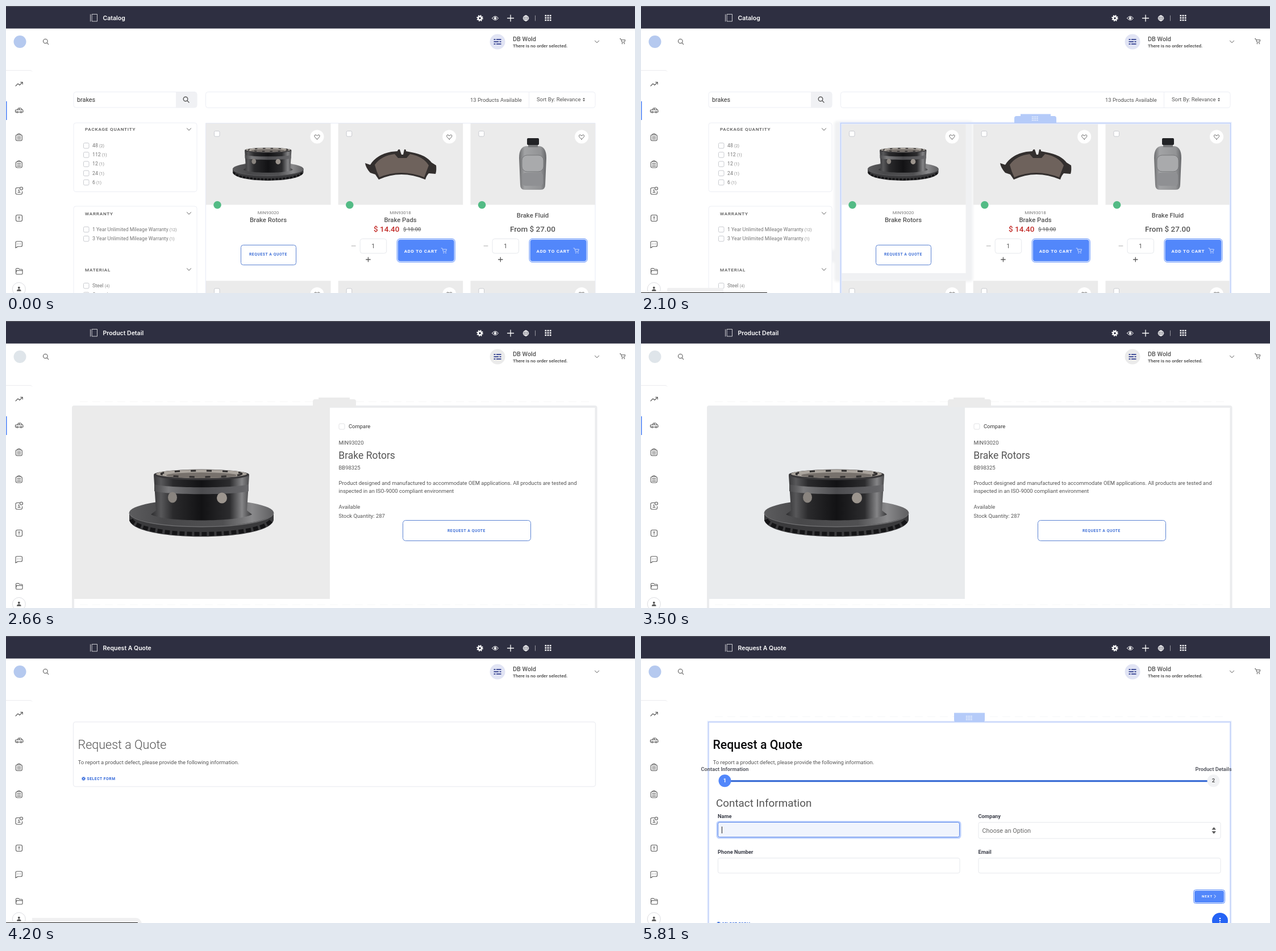
Recreate the animation shown at these times as an HTML page. Size 1107 by 506 pixels, loop 6.23 s.

```html
<!DOCTYPE html>
<html lang="en">
<head>
<meta charset="utf-8">
<title>Catalog</title>
<style>
html, body { margin: 0; width: 100%; height: 100%; overflow: hidden; background: #fff; }
svg { display: block; width: 1107px; height: 506px; font: 400 9.42px Roboto, sans-serif; fill: #555; }
.inter { font: 600 10.5px Inter, sans-serif; fill: #fff; }
.cap { font-size: 8.08px; font-weight: 500; letter-spacing: .82px; }
.opt { font-size: 8.75px; fill: #777; }
.num { font-size: 7.07px; fill: #8a8a8a; }
.sku { font-size: 8px; fill: #777; }
.name { font-size: 11.3px; font-weight: 500; }
.price { font-size: 13.46px; font-weight: 500; }
.md { font-size: 10.8px; }
.lab { font-size: 9.3px; font-weight: 700; fill: #3c3f4a; }
.btn { font-size: 6.7px; font-weight: 700; letter-spacing: .6px; fill: #3d6ed6; }
.mid { text-anchor: middle; }
.line { fill: none; stroke: #5a5a5a; stroke-linecap: round; stroke-linejoin: round; }
.white { stroke: #fff; }
.card { fill: #fff; stroke: #eceef4; }
.field { fill: #fff; stroke: #e6e8ec; }
.box { fill: #fff; stroke: #c9cbd0; }
.outline { fill: #fff; stroke: #5a82d2; }

/* Timeline: 62.3 ms per percent */
[data-a] { animation: 6230ms step-end infinite; }
[data-a=catalog] { animation-name: catalog; }
[data-a=detail] { animation-name: detail; }
[data-a=quote] { animation-name: quote; }
[data-a=select] { animation-name: select; }
[data-a=hover] { animation-name: hover; }
[data-a=status] { animation-name: status; }
[data-a=status2] { animation-name: status2; }
[data-a=rotor] { animation-name: rotor; }
[data-a=press] { animation-name: press; }
[data-a=active] { animation-name: active; }
[data-a=cart] { animation-name: cart; }
[data-a=draft] { animation-name: draft; }
[data-a=ready] { animation-name: ready; }
[data-a=frame] { animation-name: frame; }
[data-a=form] { animation-name: form; }
[data-a=ring] { animation-name: ring; }
[data-a=caret] { animation-name: caret; }
[data-a=logo] { animation-name: logo; }
[data-a=badge] { animation-name: badge; }
[data-a=panel] { animation-name: panel; }
@keyframes catalog { 0% { opacity: 1 } 34.82%, to { opacity: 0 } }
@keyframes detail { 0% { opacity: 0 } 34.82% { opacity: 1 } 67.4%, to { opacity: 0 } }
@keyframes quote { 0% { opacity: 0 } 67.4%, to { opacity: 1 } }
@keyframes select { 0% { opacity: 0 } 17.97% { opacity: .35 } 19.09% { opacity: .7 } 20.21%, to { opacity: 1 } }
@keyframes hover { 0% { opacity: 0 } 25.83% { opacity: .35 } 26.95% { opacity: .7 } 28.08%, to { opacity: 1 } }
@keyframes status { 0% { opacity: 0 } 25.83% { opacity: .4 } 26.95% { opacity: .8 } 28.08% { opacity: 1 }
  38.2% { opacity: .8 } 39.32% { opacity: .6 } 40.44% { opacity: .4 } 41.56% { opacity: .2 } 42.68%, to { opacity: 0 } }
@keyframes status2 { 0% { opacity: 0 } 64.03% { opacity: .5 } 65.16% { opacity: 1 }
  69.65% { opacity: .8 } 70.78% { opacity: .6 } 71.9% { opacity: .4 } 73.02% { opacity: .2 } 74.14%, to { opacity: 0 } }
@keyframes rotor { 0% { opacity: 0 } 35.95%, to { opacity: 1 } }
@keyframes press { 0% { opacity: 0 } 62.91% { opacity: .35 } 64.03% { opacity: .7 } 65.16%, to { opacity: 1 } }
@keyframes active { 0% { opacity: 1 } 67.4%, to { opacity: 0 } }
@keyframes cart { 0% { opacity: 1 } 67.4% { opacity: 0 } 69.65%, to { opacity: 1 } }
@keyframes draft { 0% { opacity: 1 } 71.9%, to { opacity: 0 } }
@keyframes ready { 0% { opacity: 0 } 71.9%, to { opacity: 1 } }
@keyframes frame { 0% { opacity: 0 } 76.39% { opacity: .35 } 77.52% { opacity: .7 } 78.64%, to { opacity: 1 } }
@keyframes form { 0% { opacity: 0 } 71.9% { opacity: .15 } 73.02% { opacity: .3 } 74.14% { opacity: .4 } 75.27% { opacity: .5 }
  84.26% { opacity: .8 } 85.38%, to { opacity: 1 } }
@keyframes ring { 0% { opacity: 0 } 80.89%, to { opacity: 1 } }
@keyframes caret { 0% { opacity: 0 } 77.52% { opacity: 1 } 85.38% { opacity: 0 } 92.13%, to { opacity: 1 } }
@keyframes logo { 0% { fill: #b5c9ef } 34.82% { fill: #dfe5ea } 67.4%, to { fill: #b5c9ef } }
@keyframes badge { 0% { fill: #e1e4f4 } 34.82% { fill: #ebebeb } 67.4%, to { fill: #e1e4f4 } }
@keyframes panel { 0% { fill: #ebebeb } 48.31%, to { fill: #e9ebed } }
</style>
</head>
<body>
<svg viewBox="0 0 1107 506">
<defs>
  <linearGradient id="steel">
    <stop offset="0" stop-color="#2c2c2e"/><stop offset=".1" stop-color="#58585a"/><stop offset=".22" stop-color="#2a2a2c"/>
    <stop offset=".5" stop-color="#121214"/><stop offset=".78" stop-color="#2c2c2e"/><stop offset=".9" stop-color="#858587"/><stop offset="1" stop-color="#38383a"/>
  </linearGradient>
  <linearGradient id="band">
    <stop offset="0" stop-color="#48484a"/><stop offset=".15" stop-color="#7a7a7c"/><stop offset=".5" stop-color="#4c4c4f"/><stop offset="1" stop-color="#68686b"/>
  </linearGradient>
  <linearGradient id="disc">
    <stop offset="0" stop-color="#5c5c5e"/><stop offset=".25" stop-color="#48484a"/><stop offset=".65" stop-color="#505052"/>
    <stop offset=".85" stop-color="#89898b"/><stop offset="1" stop-color="#5e5e60"/>
  </linearGradient>
  <linearGradient id="plastic">
    <stop offset="0" stop-color="#6d6e70"/><stop offset=".2" stop-color="#a2a3a5"/><stop offset=".8" stop-color="#929395"/><stop offset="1" stop-color="#66676a"/>
  </linearGradient>
  <filter id="soft"><feGaussianBlur stdDeviation="2"/></filter>
  <g id="gear" fill="none" stroke="currentColor">
    <circle r="3" stroke-width="2.6"/><circle r="4.8" stroke-width="1.9" stroke-dasharray="1.9 1.87"/>
  </g>
  <g id="cartIcon" fill="none" stroke="currentColor">
    <path d="M-5-4.500h2l2 6h4.500l1.300-4h-6.500"/><circle cx="-.5" cy="3.800" r=".6"/><circle cx="3.300" cy="3.800" r=".6"/>
  </g>
  <path id="chev" class="line" d="M-3.500-1.800 0 1.800 3.500-1.800"/>
  <rect id="check" class="box" width="9.500" height="9.500" rx="2"/>
  <g id="clip" class="line" stroke-width="1.100">
    <rect x="-5.500" y="-4.500" width="11" height="10.500" rx="2.500"/><path d="M-2.500-4.500q0-2 2.500-2t2.500 2M-3-1.500h6M-3 1h6M-3 3.500h6"/>
  </g>
  <g id="tile">
    <rect width="219.500" height="143.500" fill="#ebebeb"/>
    <use href="#check" x="14.500" y="13.500"/>
    <circle cx="195.500" cy="23.500" r="12" fill="#fff"/>
    <path class="line" d="M195.500 27.800c-8-5.500-4-10 0-6 4-4 8 .5 0 6z"/>
  </g>
  <g id="buy">
    <path class="line" style="stroke:#aaa" d="M23.500 216h7"/><path class="line" stroke-width="1.300" d="M49 240h7.500M52.750 236.250v7.500"/>
    <rect class="field" x="38.500" y="203.500" width="46.500" height="25.500" rx="4"/>
    <text class="md mid" x="61.500" y="220">1</text>
    <rect x="103.500" y="203.500" width="102" height="41" rx="5" fill="#fff" stroke="#5287fb"/>
    <rect x="105" y="205" width="99" height="38" rx="4" fill="#5287fb"/>
    <text x="116" y="227.500" font-size="8" font-weight="700" letter-spacing=".75" fill="#fff">ADD TO CART</text>
    <use href="#cartIcon" x="186" y="224.500" color="#c9d9fd"/>
  </g>
  <g id="rotor">
    <path d="M217 337v14c8 39 246 39 254 0v-14z" fill="#3a3a3c"/>
    <path d="M220 350c16 34 232 34 248 0" fill="none" stroke="#151517" stroke-width="7" stroke-dasharray="9 4"/>
    <ellipse cx="344" cy="338" rx="127" ry="24" fill="url(#disc)"/>
    <path d="M217 338c4 33 250 33 254 0" fill="none" stroke="#6e6e70" stroke-width="1.500"/>
    <path d="M260 272l4 62-9 7c24 14 154 14 178 0l-9-7 4-62z" fill="url(#steel)"/>
    <path d="M261 288c24 7 142 7 166 0v12c-24 7-142 7-166 0z" fill="url(#band)"/>
    <ellipse cx="344" cy="271" rx="84" ry="9.500" fill="#3a393b"/>
    <ellipse cx="344" cy="269.500" rx="80" ry="7.500" fill="#aaa49d"/>
    <ellipse cx="344" cy="272" rx="62" ry="5" fill="#77716c"/>
    <ellipse cx="344" cy="269.500" rx="71" ry="5.500" fill="none" stroke="#302e2e" stroke-width="3" stroke-dasharray="9 19"/>
    <ellipse cx="293" cy="311" rx="8" ry="9.500" fill="#89847f"/>
    <ellipse cx="380" cy="312" rx="9" ry="9.500" fill="#9c958e"/>
  </g>
  <path id="dots" d="M-6-3.500h12M-6-.5h12M-6 2.500h12" fill="none" stroke="#fff" stroke-width="1.500" stroke-dasharray="1.500 1.500"/>
  <g id="tab"><path d="M-27-8.500h54V4q0 4-4 4h-46q-4 0-4-4z" fill="#b5cbf9"/><use href="#dots" y="1"/></g>
  <g id="formLink" color="#2b63d9">
    <use href="#gear" transform="scale(.6)"/>
    <text class="btn" x="6" y="2.500" style="fill:#2b63d9">SELECT FORM</text>
  </g>
</defs>

<rect width="1107" height="506" fill="#fff"/>

<g data-a="catalog">
  <g data-a="hover" filter="url(#soft)" fill="#f0f1f3">
    <rect x="340" y="203" width="244" height="283" rx="5"/><rect x="334" y="430" width="14" height="22" rx="3"/>
  </g>
  <rect class="card" x="119" y="151.500" width="217" height="27.500" rx="4"/>
  <path d="M299 152h33q4 0 4 4v19q0 4-4 4h-33z" fill="#f0f1f4"/>
  <text class="md" x="125" y="169" style="fill:#333">brakes</text>
  <g class="line" stroke-width="1.400"><circle cx="316" cy="164" r="3.800"/><path d="M319 167l3 3"/></g>
  <rect class="card" x="351.500" y="151.500" width="685.500" height="28" rx="4"/>
  <path d="M920.500 152v27.500" stroke="#eceef4"/>
  <text x="817" y="168.700">13 Products Available</text>
  <text x="934" y="168">Sort By: Relevance</text>
  <path d="M1015 164.200h4l-2-2.500zM1015 165.800h4l-2 2.500z"/>

  <rect class="card" x="119" y="206" width="217" height="121.500" rx="4"/>
  <rect class="card" x="119" y="353" width="217" height="170" rx="4"/>
  <g class="cap"><text x="139" y="220">PACKAGE QUANTITY</text><text x="139" y="368.500">WARRANTY</text><text x="139" y="467.500">MATERIAL</text></g>
  <use href="#chev" x="322" y="217.500"/><use href="#chev" x="322" y="365.500"/><use href="#chev" x="322" y="464.500"/>
  <use href="#check" x="136.500" y="241.500"/><use href="#check" x="136.500" y="257.700"/><use href="#check" x="136.500" y="273.900"/>
  <use href="#check" x="136.500" y="290.100"/><use href="#check" x="136.500" y="306.300"/><use href="#check" x="136.500" y="389.300"/>
  <use href="#check" x="136.500" y="405.500"/><use href="#check" x="136.500" y="488.500"/><use href="#check" x="136.500" y="504.700"/>
  <g class="opt">
    <text x="152" y="249">48 <tspan class="num">(2)</tspan></text>
    <text x="152" y="265.200">112 <tspan class="num">(1)</tspan></text>
    <text x="152" y="281.400">12 <tspan class="num">(1)</tspan></text>
    <text x="152" y="297.600">24 <tspan class="num">(1)</tspan></text>
    <text x="152" y="313.800">6 <tspan class="num">(1)</tspan></text>
    <text x="152" y="396.700">1 Year Unlimited Mileage Warranty <tspan class="num">(12)</tspan></text>
    <text x="152" y="412.900">3 Year Unlimited Mileage Warranty <tspan class="num">(1)</tspan></text>
    <text x="152" y="496">Steel <tspan class="num">(4)</tspan></text>
    <text x="152" y="512.200">Ceramic</text>
  </g>

  <path d="M351.500 520V206.500h685.500V520" fill="none" stroke="#e6eaf5"/>
  <rect x="352" y="350" width="219.500" height="121" fill="#fff"/>
  <use href="#tile" x="352" y="207"/><use href="#tile" x="584.700" y="207"/><use href="#tile" x="817.500" y="207"/>
  <use href="#tile" x="352" y="484.500"/><use href="#tile" x="584.700" y="484.500"/><use href="#tile" x="817.500" y="484.500"/>
  <g fill="#53bb85"><circle cx="372" cy="350.700" r="6.800"/><circle cx="604.800" cy="350.700" r="6.800"/><circle cx="837.600" cy="350.700" r="6.800"/></g>

  <use href="#rotor" transform="translate(292.700 121.600) scale(.49)"/>
  <path d="M632 277l9 3q11-18 37-23l11-1q1-4 4-3l3 9h3l2-9q3-1 3 3l10 2q24 4 35 18l8 5q1 9-1 15l-12-1q-4 4-6 11-43-18-82 0-4-6-6-9l-9-3q-8-9-9-17z" fill="#332f2e"/>
  <path d="M649 280q11-16 35-19l6 7h15l6-7q23 4 33 20l-8 21q-41-16-79 0-5-10-8-22z" fill="#6e625c"/>
  <path d="M903 268q0-21 14-21h20q14 0 14 21l-2 47q0 9-8 9h-28q-8 0-8-9z" fill="url(#plastic)"/>
  <rect x="908" y="263" width="38" height="29" rx="9" fill="#a9aaac" stroke="#77787b"/>
  <rect x="909" y="294" width="36" height="23" rx="5" fill="#8f9093"/>
  <rect x="917" y="233" width="21" height="12" rx="2" fill="#222326"/>
  <rect x="919" y="245" width="17" height="4" fill="#77787a"/>

  <g class="mid">
    <text class="sku" x="461.500" y="367">MIN93020</text><text class="name" x="461.500" y="380.800">Brake Rotors</text>
    <text class="sku" x="694" y="367">MIN93018</text><text class="name" x="694" y="380.800">Brake Pads</text>
    <text class="name" x="927" y="373">Brake Fluid</text><text class="price" x="927" y="398.200">From $ 27.00</text>
  </g>
  <text class="price" x="647" y="398.200" style="fill:#c22b28">$ 14.40</text>
  <text x="699" y="396.700" text-decoration="line-through">$ 18.00</text>
  <rect class="outline" x="413.500" y="421.500" width="97" height="35" rx="4"/>
  <text class="btn" x="428" y="440.200">REQUEST A QUOTE</text>
  <use href="#buy" x="584.700" y="207"/><use href="#buy" x="817.500" y="207"/>

  <g data-a="select" fill="none">
    <rect x="351.500" y="206.500" width="686" height="320" stroke="#e4ecfe" stroke-width="4"/>
    <rect x="351.500" y="206.500" width="686" height="320" stroke="#b9caf5"/>
    <path d="M657 206v-8q0-4 4-4h7v-3.500h53v3.500h6q4 0 4 4v8z" fill="#b5cbf9"/><use href="#dots" x="694" y="199"/>
  </g>
</g>

<g data-a="detail">
  <path d="M130 142H540M616 142H1030" stroke="#f6f7f7" stroke-dasharray="14 8"/>
  <rect x="118" y="151" width="920.500" height="370" rx="2" fill="#fff" stroke="#ebecee" stroke-width="4"/>
  <rect data-a="panel" x="117" y="150" width="453" height="340" fill="#ebebeb"/>
  <path d="M540 152v-10q0-4 4-4h6v-3h55v3h7q4 0 4 4v10z" fill="#ebebeb"/>
  <use data-a="rotor" href="#rotor"/>
  <path d="M130 500H1030" stroke="#f7f8f8" stroke-dasharray="14 8"/>
  <rect x="586" y="181" width="10" height="10" rx="2" fill="#fff" stroke="#e2e3e5"/>
  <text x="603" y="189" style="fill:#333">Compare</text>
  <text x="585.500" y="217.500">MIN93020</text>
  <text x="585.300" y="242.800" font-size="17.500">Brake Rotors</text>
  <text x="585.500" y="262.300">BB98325</text>
  <text x="585.500" y="288.500">Product designed and manufactured to accommodate OEM applications. All products are tested and</text>
  <text x="585.500" y="302.800">inspected in an ISO-9000 compliant environment</text>
  <text x="585.500" y="330.700">Available</text>
  <text x="585.500" y="347.400">Stock Quantity: 287</text>
  <g data-a="press">
    <rect x="685" y="338" width="252" height="66" rx="20" fill="#f9fafb"/>
    <rect x="691" y="345" width="240" height="52" rx="12" fill="#f1f2f5"/>
    <rect x="694.500" y="348" width="233" height="45" rx="9" fill="#e8eaee"/>
  </g>
  <rect class="outline" x="698.500" y="351.500" width="225" height="36" rx="5"/>
  <text class="btn" x="777" y="372">REQUEST A QUOTE</text>
</g>

<g data-a="quote">
  <g data-a="draft">
    <rect x="118.500" y="151.500" width="919" height="114" rx="4" fill="#fff" stroke="#eeeff3" stroke-width="1.500"/>
    <text x="126.500" y="199" font-size="21.500" font-weight="300">Request a Quote</text>
    <use href="#formLink" x="136.500" y="251.500"/>
  </g>
  <g data-a="ready">
    <path d="M130 142H1030" stroke="#f5f6f8" stroke-dasharray="14 8"/>
    <rect x="118.500" y="151.500" width="919" height="380" rx="3" fill="#fff" stroke="#eeeff3"/>
    <g data-a="frame" fill="none">
      <rect x="118.500" y="151.500" width="919" height="380" stroke="#e6edfe" stroke-width="4"/>
      <rect x="118.500" y="151.500" width="919" height="380" stroke="#b6c8f6"/>
      <use href="#tab" x="578" y="144"/>
    </g>
    <text x="126.500" y="199" font-size="21.300" font-weight="500" style="fill:#0a0a0c">Request a Quote</text>
    <use href="#formLink" x="136.500" y="507"/>
    <circle cx="1019" cy="502" r="14" fill="#2563f5"/>
    <g fill="#fff"><circle cx="1019" cy="498" r="1.300"/><circle cx="1019" cy="502" r="1.300"/><circle cx="1019" cy="506" r="1.300"/></g>
  </g>
  <text x="126.700" y="226.200">To report a product defect, please provide the following information.</text>

  <g data-a="form">
    <text class="lab mid" x="147.500" y="238" style="fill:#5c5e66">Contact Information</text>
    <text class="lab mid" x="1007.500" y="238" style="fill:#5c5e66">Product Details</text>
    <path d="M150 255.700H1000" stroke="#2e63d2" stroke-width="3"/>
    <circle cx="147.500" cy="255.300" r="11" fill="#5287fb"/><circle cx="1007.500" cy="255.300" r="11" fill="#f1f2f4"/>
    <text class="lab mid" x="147.500" y="258.400" style="fill:#fff">1</text><text class="lab mid" x="1007.500" y="258.400" style="fill:#555">2</text>
    <text x="132" y="301.300" font-size="18.840">Contact Information</text>
    <g class="lab">
      <text x="135" y="321.300">Name</text><text x="593.500" y="321.300">Company</text>
      <text x="135" y="383.800">Phone Number</text><text x="593.500" y="383.800">Email</text>
    </g>
    <rect x="135" y="328.500" width="426" height="27" rx="3" fill="#f0f4fd"/>
    <g data-a="ring" fill="none">
      <rect x="134" y="327.500" width="428" height="28.500" rx="4" stroke="#bdd1fd" stroke-width="3"/>
      <rect x="135.500" y="328.500" width="425" height="26" rx="3" stroke="#5b87e8"/>
    </g>
    <path data-a="caret" d="M142.500 336v12" stroke="#222"/>
    <rect class="field" x="594" y="328.500" width="426" height="28.500" rx="3"/>
    <text class="md" x="600.500" y="346.800" style="fill:#666">Choose an Option</text>
    <path d="M1004.500 341.500h7.500l-3.750-4.500zM1004.500 344.200h7.500l-3.750 4.500z"/>
    <rect class="field" x="135.500" y="391.500" width="425.500" height="26.500" rx="3"/>
    <rect class="field" x="594" y="391.500" width="426" height="26.500" rx="3"/>
    <rect x="972.500" y="447.500" width="55" height="24" rx="4" fill="#fff" stroke="#5287fb"/>
    <rect x="974" y="449" width="52" height="21" rx="3" fill="#5287fb"/>
    <text x="987" y="461.300" font-size="6" font-weight="700" letter-spacing="1" fill="#fff">NEXT</text>
    <path class="line white" d="M1009 456.500l2.500 2.500-2.500 2.500"/>
  </g>
</g>

<g fill="#f0f0f1"><rect data-a="status" x="46" y="497" width="99" height="8" rx="2"/><path data-a="status2" d="M46 497h182q8 0 11 9H46z"/></g>

<!-- Sidebar -->
<path d="M0 113.500h42q3 0 4 2" fill="none" stroke="#ececef"/>
<rect data-a="active" y="168" width="1.500" height="33" fill="#4f83f8"/>
<g class="line" stroke-width="1.100">
  <path d="M17 141l4-4 3 2.500 5-5M25.500 134.300h3.700v3.700"/>
  <path d="M18.500 187h-2v-3.500l3.500-.8 2-2.700h4l2.500 2.700q2 .3 1.500 4.300h-2M21 187h4M19 183h9M23.500 180v3"/>
  <circle cx="19.800" cy="187" r="1.300"/><circle cx="26.500" cy="187" r="1.300"/>
  <path d="M24 320.500h-4.500q-2.500 0-2.500 2.500v6.500q0 2.500 2.500 2.500h6.500q2.500 0 2.500-2.500V327M21.500 324.500h1.500v4M21 328.500h4"/>
  <circle cx="27" cy="321.800" r="2.500"/>
  <rect x="17.500" y="368.500" width="11" height="11" rx="2.500"/><path d="M23 371.300v3.200M23 376.700v.1" stroke-width="1.500"/>
  <path d="M19 415h7.500q2 0 2 2v5q0 2-2 2H21l-4 2.500V417q0-2 2-2zM20 419.500h.2M22.800 419.500h.2M25.600 419.500h.2"/>
  <path d="M17.500 471v-7q0-1.500 1.500-1.500h3l1.500 1.700h4q1.500 0 1.500 1.300v6q0 1.500-1.500 1.500H19q-1.500 0-1.500-2zl1-4.500h10.500"/>
</g>
<use href="#clip" x="22.800" y="231.500"/><use href="#clip" x="22.800" y="279"/>
<circle cx="22.800" cy="499" r="11.500" fill="#fff" stroke="#dcdde1"/>
<circle cx="22.800" cy="496.700" r="1.900"/><path d="M19 502.800q0-3.500 3.800-3.500t3.800 3.500z"/>
<rect data-a="status" y="505" width="222" height="2" rx=".5" fill="#222"/>
<rect data-a="status2" y="505" width="232" height="2" rx=".5" fill="#222"/>

<!-- Account row -->
<circle data-a="logo" cx="24.500" cy="63" r="11" fill="#b5c9ef"/>
<g class="line" stroke-width="1.100"><circle cx="69.300" cy="62" r="3.800"/><path d="M72.200 65l2.500 2.700"/></g>
<circle data-a="badge" cx="865" cy="63" r="13.500" fill="#e1e4f4"/>
<path d="M858.500 59h3M863 59h8.500M858.500 63h8.500M868.500 63h3M858.500 67h3M863 67h8.500" stroke="#46529a" stroke-width="2.200"/>
<text class="md" x="892" y="61.700" font-weight="500">DB Wold</text>
<text x="892" y="72.800" font-size="8.080" font-weight="500" style="fill:#444">There is no order selected.</text>
<use href="#chev" x="1040" y="63"/>
<g data-a="cart" color="#555"><use href="#cartIcon" x="1085" y="62.300"/></g>

<!-- Top bar -->
<rect width="1107" height="39.700" fill="#2e2f41"/><rect width="1107" height="1.200" fill="#55565f"/>
<g class="line white">
  <path d="M148.500 15v12M151.500 14.500h9v12.500h-9z" stroke-opacity=".75"/>
  <path d="M882.500 21.500h11M888 16v11" stroke-width="1.300"/>
  <path d="M855.500 21.500q5.500-7 11 0-5.500 7-11 0z"/><circle cx="861" cy="21.500" r="1.800" fill="#fff"/>
  <circle cx="915" cy="21.500" r="4.700"/><ellipse cx="915" cy="21.500" rx="2.200" ry="4.700"/><path d="M910.300 21.500h9.400M915 16.800v9.400M911 19h8M911 24h8"/>
  <path d="M931.500 17v9" stroke-opacity=".5"/>
</g>
<use href="#gear" x="834" y="21.500" color="#fff"/>
<path d="M948.500 17h11M948.500 21h11M948.500 25h11" stroke="#fff" stroke-width="2.700" stroke-dasharray="2.700 1.450"/>
<g class="inter">
  <text data-a="catalog" x="170.500" y="24.500">Catalog</text>
  <text data-a="detail" x="170.500" y="24.500">Product Detail</text>
  <text data-a="quote" x="170.500" y="24.500">Request A Quote</text>
</g>
</svg>
</body>
</html>
```
